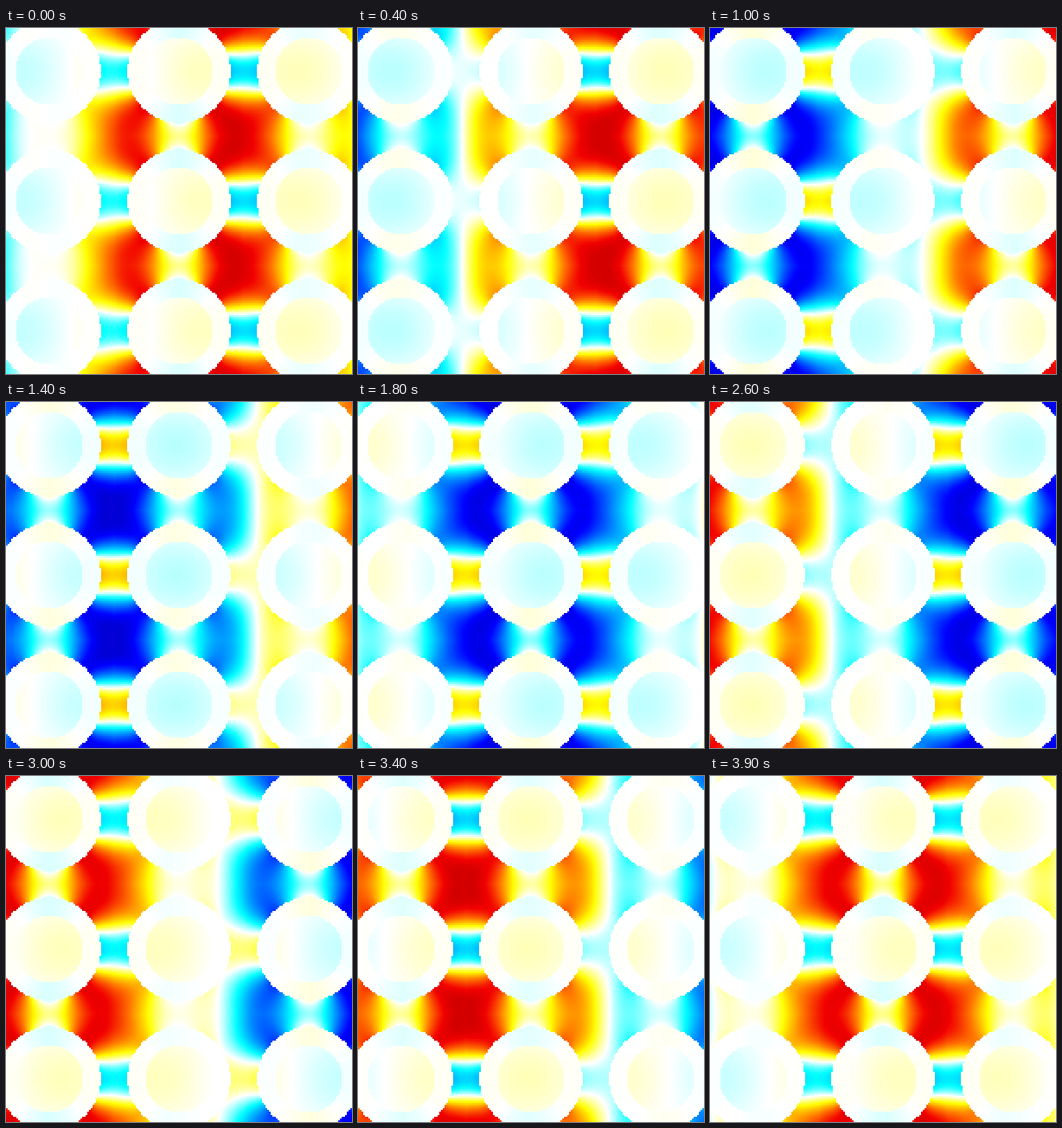
These frames come from a looping animation (400x400 px, 4 s). An HTML page with a canvas:

```html
<!DOCTYPE html>
<html lang="en">
<head>
<meta charset="utf-8">
<title>Wave through a lattice of rods</title>
<style>
  html, body { margin: 0; width: 100%; height: 100%; overflow: hidden; background: #fff; }
  canvas { display: block; width: 400px; height: 400px; image-rendering: pixelated; }
</style>
</head>
<body>
<canvas id="stage" width="200" height="200"></canvas>
<script>
const SIZE = 200, SCALE = 2, PITCH = 150, HALF = PITCH / 2;
const ROD = 59.5, CORE = 39;
const LOOP = 4000, STEP = 100, LEAD = 150;
const RAD = Math.PI / 180, CELL_PHASE = 72, EDGE_PHASE = 36;

// Colour stops by field strength: [strength, r, g, b]
const WARM = [[0, 255, 255, 255], [0.25, 255, 255, 0], [0.55, 255, 120, 0], [0.86, 242, 0, 0], [1, 212, 0, 0]];
const COOL = [[0, 255, 255, 255], [0.25, 0, 255, 255], [0.86, 0, 0, 255], [1, 0, 0, 215]];

const ctx = document.getElementById('stage').getContext('2d');
const image = ctx.createImageData(SIZE, SIZE);
const real = new Float32Array(SIZE * SIZE);
const imag = new Float32Array(SIZE * SIZE);

const sq = v => v * v;

function ramp(stops) {
  return Array.from({ length: 256 }, (_, i) => {
    const v = i / 255;
    const k = Math.max(1, stops.findIndex(s => s[0] >= v));
    const a = stops[k - 1], b = stops[k];
    const f = (v - a[0]) / (b[0] - a[0]);
    return [1, 2, 3].map(c => a[c] + (b[c] - a[c]) * f);
  });
}
const warm = ramp(WARM), cool = ramp(COOL);

// Field between the rods: in-phase part, quadrature part, phase in degrees
function outside(x, y, r) {
  const s = x / HALF, cy = Math.PI * y / HALF;
  const across = 0.15 + 0.85 * sq(Math.sin(Math.PI * s / 2)) + 0.06 * sq(Math.sin(Math.PI * s));
  const along = 0.445 - 0.675 * Math.cos(cy) - 0.12 * Math.cos(2 * cy);
  const diagonal = 2 * x * y / (r * r);
  const corner = 0.6 * diagonal ** 4 * Math.exp((ROD - r) / 15);
  const cap = 0.16 * (y / r) ** 8 * Math.exp((ROD - r) / 10);
  return {
    rho: across + along - 1 + corner - cap,
    sigma: 0.12 * Math.sin(Math.PI * s) * Math.exp(-sq(y / 35)),
    phase: EDGE_PHASE * (0.45 * s + 0.55 * s ** 3)
  };
}

function inside(x, y, r) {
  if (r < CORE) {
    return { rho: 0.07 * Math.cos(y / 34) * (1 - sq(x / 90)), sigma: 0, phase: 1.2 * x - 35 };
  }
  const pole = (Math.abs(y) / r) ** 4;
  return { rho: 0.012 * (1 - pole) - 0.035 * pole, sigma: 0, phase: 0.5 * x - 15 * (1 - pole) };
}

function buildField() {
  for (let j = 0; j < SIZE; j++) {
    for (let i = 0; i < SIZE; i++) {
      const px = (i + 0.5) * SCALE - 200, py = (j + 0.5) * SCALE - 200;
      const col = Math.round(px / PITCH);
      const x = px - col * PITCH, y = py - Math.round(py / PITCH) * PITCH;
      const r = Math.hypot(x, y);
      const f = (r < ROD ? inside : outside)(x, y, r);
      const phi = (f.phase + col * CELL_PHASE) * RAD;
      const k = j * SIZE + i;
      real[k] = f.rho * Math.cos(phi) + f.sigma * Math.sin(phi);
      imag[k] = f.rho * Math.sin(phi) - f.sigma * Math.cos(phi);
    }
  }
}

function draw(time) {
  const psi = 2 * Math.PI * (time + LEAD) / LOOP;
  const c = Math.cos(psi), s = Math.sin(psi);
  const data = image.data;
  for (let k = 0, p = 0; k < real.length; k++, p += 4) {
    const u = real[k] * c + imag[k] * s;
    const rgb = (u > 0 ? warm : cool)[Math.min(255, Math.round(Math.abs(u) * 255))];
    data[p] = rgb[0];
    data[p + 1] = rgb[1];
    data[p + 2] = rgb[2];
    data[p + 3] = 255;
  }
  ctx.putImageData(image, 0, 0);
}

let shown = -1;
function tick() {
  const step = Math.floor(performance.now() % LOOP / STEP);
  if (step !== shown) {
    shown = step;
    draw(step * STEP);
  }
  requestAnimationFrame(tick);
}

buildField();
tick();
</script>
</body>
</html>
```
